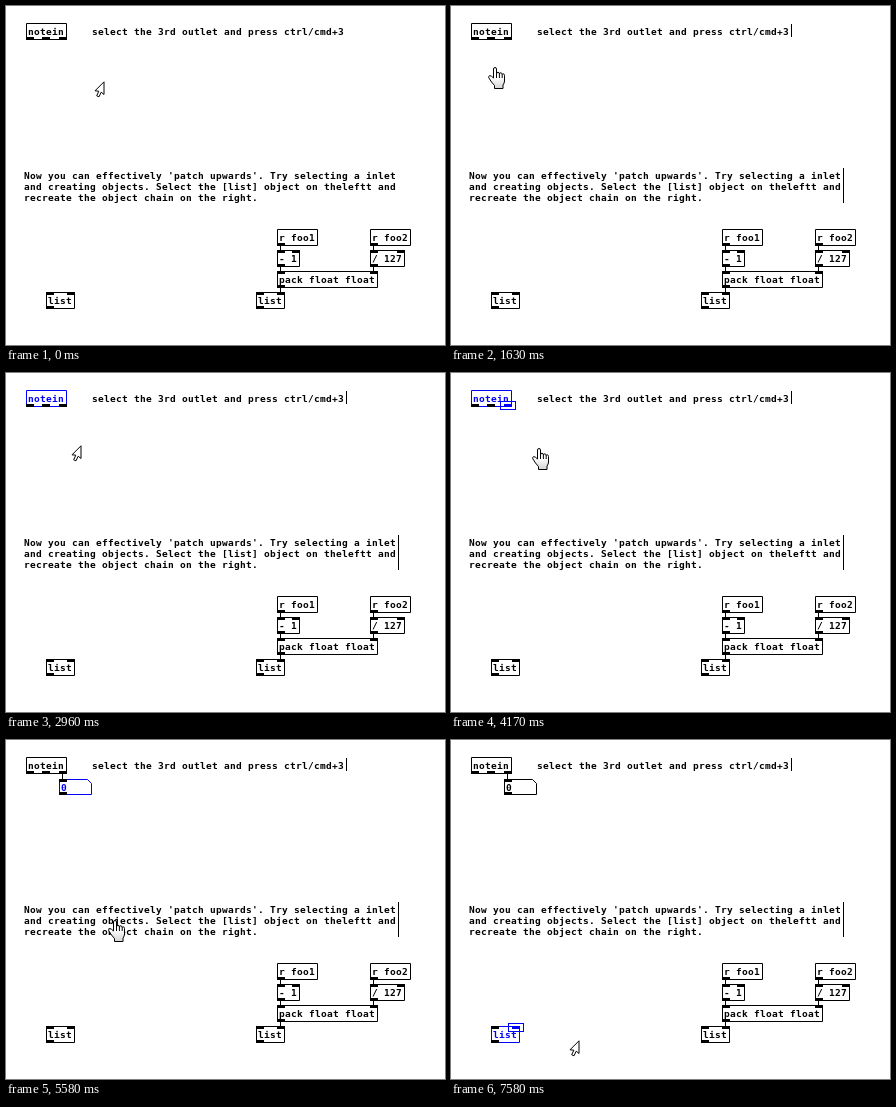
Write an HTML page that moves like this. It is 439 px wide and 339 px high and loops after 8000 ms.

```html
<!DOCTYPE html>
<html lang="en">
<head>
<meta charset="utf-8">
<title>Patching from outlets and inlets</title>
<style>
  html, body { margin: 0; width: 100%; height: 100%; overflow: hidden; background: #fff; }
  svg { display: block; width: 439px; height: 339px; }
  text {
    font: bold 9.5px "DejaVu Sans Mono", monospace;
    letter-spacing: .28px;
    white-space: pre;
  }
  .line { fill: none; stroke: #000; }
  .selected .line, .line.mark { stroke: #00f; }
  .selected text, .port.active { fill: #00f; }
  .pointer { stroke: #000; stroke-linejoin: round; }
</style>
</head>
<body>
<svg id="stage" viewBox="0 0 439 339" xmlns="http://www.w3.org/2000/svg">
  <defs>
    <linearGradient id="skin" x1="0" y1="0" x2="0" y2="1">
      <stop offset=".45" stop-color="#fff"/>
      <stop offset="1" stop-color="#d4d4d4"/>
    </linearGradient>
  </defs>
</svg>
<script>
const LOOP = 8000;
const EDIT_ON = 1080, NOTEIN_PICKED = 2290, NUMBER_MADE = 4710;
const NUMBER_DROPPED = 6080, LIST_PICKED = 6500;
const CHAR = 6, PORT = 8, BOX = 16;
const stage = document.getElementById('stage');

function set(node, attrs) {
  for (const key in attrs) node.setAttribute(key, attrs[key]);
  return node;
}

function add(parent, tag, attrs, text = '') {
  const node = document.createElementNS('http://www.w3.org/2000/svg', tag);
  node.textContent = text;
  parent.append(node);
  return set(node, attrs);
}

const path = (parent, d) => add(parent, 'path', { class: 'line', d });
const label = (parent, x, y, text) => add(parent, 'text', { x, y }, text);
const wire = (x, y, length) => path(stage, `M${x + .5} ${y}v${length}`);

function port(parent, x, y) {
  const node = add(parent, 'rect', { class: 'port', x, y, width: PORT, height: 3 });
  return { node, x, y };
}

// Ports are spread evenly from the left edge of the box to the right.
function ports(parent, count, x, y, width) {
  const gap = (width + 1 - PORT) / Math.max(1, count - 1);
  return Array.from({ length: count }, (_, i) => port(parent, x + Math.floor(i * gap), y));
}

function object(x, y, text, inletCount, outletCount = 1) {
  const group = add(stage, 'g');
  const width = text.length * CHAR + 4;
  path(group, `M${x + .5} ${y + .5}h${width}v${BOX}h${-width}z`);
  label(group, x + 2, y + 12, text);
  return {
    group,
    inlets: ports(group, inletCount, x, y, width),
    outlets: ports(group, outletCount, x, y + BOX - 2, width)
  };
}

label(stage, 86, 29, 'select the 3rd outlet and press ctrl/cmd+3');
[
  "Now you can effectively 'patch upwards'. Try selecting a inlet",
  'and creating objects. Select the [list] object on theleftt and',
  'recreate the object chain on the right.'
].forEach((text, i) => label(stage, 18, 173 + 11 * i, text));
const editBars = path(stage, 'M340.5 18v13M392.5 162v35');

const notein = object(20, 17, 'notein', 0, 3);
const list = object(40, 286, 'list', 2);
object(271, 223, 'r foo1', 0);
object(364, 223, 'r foo2', 0);
object(271, 244, '- 1', 2);
object(364, 244, '/ 127', 2);
object(271, 265, 'pack float float', 2);
object(250, 286, 'list', 2);
for (const x of [274, 367]) {
  wire(x, 239, 6);
  wire(x, 260, 6);
}
wire(274, 281, 6);

const numberWire = wire(56, 33, 7);
const number = add(stage, 'g');
path(number, 'M53.5 39.5h28l4 4v11h-32z');
port(number, 53, 39);
port(number, 53, 52);
label(number, 55, 51, '0');

const mark = add(stage, 'rect', { class: 'line mark', width: 15, height: 8 });
const lasso = add(stage, 'rect', { class: 'line' });

const arrow = add(stage, 'path', {
  class: 'pointer', fill: '#fff',
  d: 'M0 .8V13.5L-2.8 11.2L-5 15.8L-7.3 14.8L-5.2 10.2L-9 9.8Z'
});
const hand = add(stage, 'path', {
  class: 'pointer', fill: 'url(#skin)',
  d: 'M.5 12V3Q.5 1.5 2 1.5T3.5 3V8Q3.6 6.2 5 6.2T6.4 8Q6.6 6.8 7.8 6.8T9.2 8.6' +
     'Q9.4 7.7 10.4 7.8T11.5 9.5V15Q11.5 17 10 19V22.5H1.5V19.5L-1.5 16L-4.2 11.8' +
     'Q-4.8 10 -3.2 9.6Q-1.8 9.6 .5 12ZM3.5 8V12M6.4 8V12M9.2 8.6V12'
});

const home = { x: 98, y: 75 };
const moves = [
  { from: 1080, to: 1630, x: 42, y: 60 },
  { from: 1630, to: 1920, x: 18, y: 19 },
  { from: 2010, to: 2040, x: 51, y: 74 },
  { from: 2040, to: 2240, x: 75, y: 72 },
  { from: 4145, to: 4420, x: 134, y: 84 },
  { from: 5500, to: 5580, x: 108, y: 177 },
  { from: 5580, to: 5670, x: 66, y: 271 },
  { from: 5800, to: 5960, x: 36, y: 256 },
  { from: 6080, to: 6330, x: 68, y: 301 },
  { from: 6500, to: 6670, x: 128, y: 300 }
];

// The drawn pointer trails the first, fast drag a little.
const drags = [
  { from: 1960, to: NOTEIN_PICKED, x: 17, y: 20, lead: 40 },
  { from: NUMBER_DROPPED, to: LIST_PICKED, x: 35, y: 256, lead: 0 }
];

const markSteps = [
  [3080, notein.outlets[0]], [3380, notein.outlets[1]], [3540, notein.outlets[2]],
  [NUMBER_MADE, null], [7250, list.inlets[0]], [7580, list.inlets[1]]
];

// Holding ctrl swaps the hand for the arrow, letting go swaps back.
const pointerSwaps = [EDIT_ON, 2960, 3960, 4630, 5000, 7250];

const easeOut = k => 1 - (1 - k) ** 2;
const within = (t, from, to) => t >= from && t < to;
const show = (node, on) => set(node, { visibility: on ? 'visible' : 'hidden' });
const select = (node, on) => node.classList.toggle('selected', on);

function pointerAt(t) {
  let { x, y } = home;
  for (const move of moves) {
    if (t < move.from) break;
    const k = easeOut(Math.min(1, (t - move.from) / (move.to - move.from)));
    x += (move.x - x) * k;
    y += (move.y - y) * k;
  }
  return { x: Math.round(x), y: Math.round(y) };
}

function drawMark(t) {
  const step = markSteps.filter(([time]) => t >= time).pop();
  const marked = step && step[1];
  for (const [, p] of markSteps) if (p) p.node.classList.toggle('active', p === marked);
  show(mark, marked);
  if (marked) set(mark, { x: marked.x - 3.5, y: marked.y - 2.5 });
}

function drawLasso(t) {
  const drag = drags.find(({ from, to }) => within(t, from, to));
  show(lasso, drag);
  if (!drag) return;
  const corner = pointerAt(t + drag.lead);
  set(lasso, {
    x: drag.x + .5,
    y: drag.y + .5,
    width: Math.max(0, corner.x - drag.x),
    height: Math.max(0, corner.y - drag.y)
  });
}

function drawPointer(t) {
  const isArrow = pointerSwaps.filter(time => t >= time).length % 2 === 0;
  const { x, y } = pointerAt(t);
  show(arrow, isArrow);
  show(hand, !isArrow);
  set(isArrow ? arrow : hand, { transform: `translate(${x} ${y})` });
}

function draw(t) {
  show(editBars, t >= EDIT_ON);
  show(number, t >= NUMBER_MADE);
  show(numberWire, t >= NUMBER_MADE);
  select(notein.group, within(t, NOTEIN_PICKED, NUMBER_MADE));
  select(number, within(t, NUMBER_MADE, NUMBER_DROPPED));
  select(list.group, t >= LIST_PICKED);
  drawMark(t);
  drawLasso(t);
  drawPointer(t);
}

const start = performance.now();
function tick() {
  draw((performance.now() - start) % LOOP);
  requestAnimationFrame(tick);
}
tick();
</script>
</body>
</html>
```
